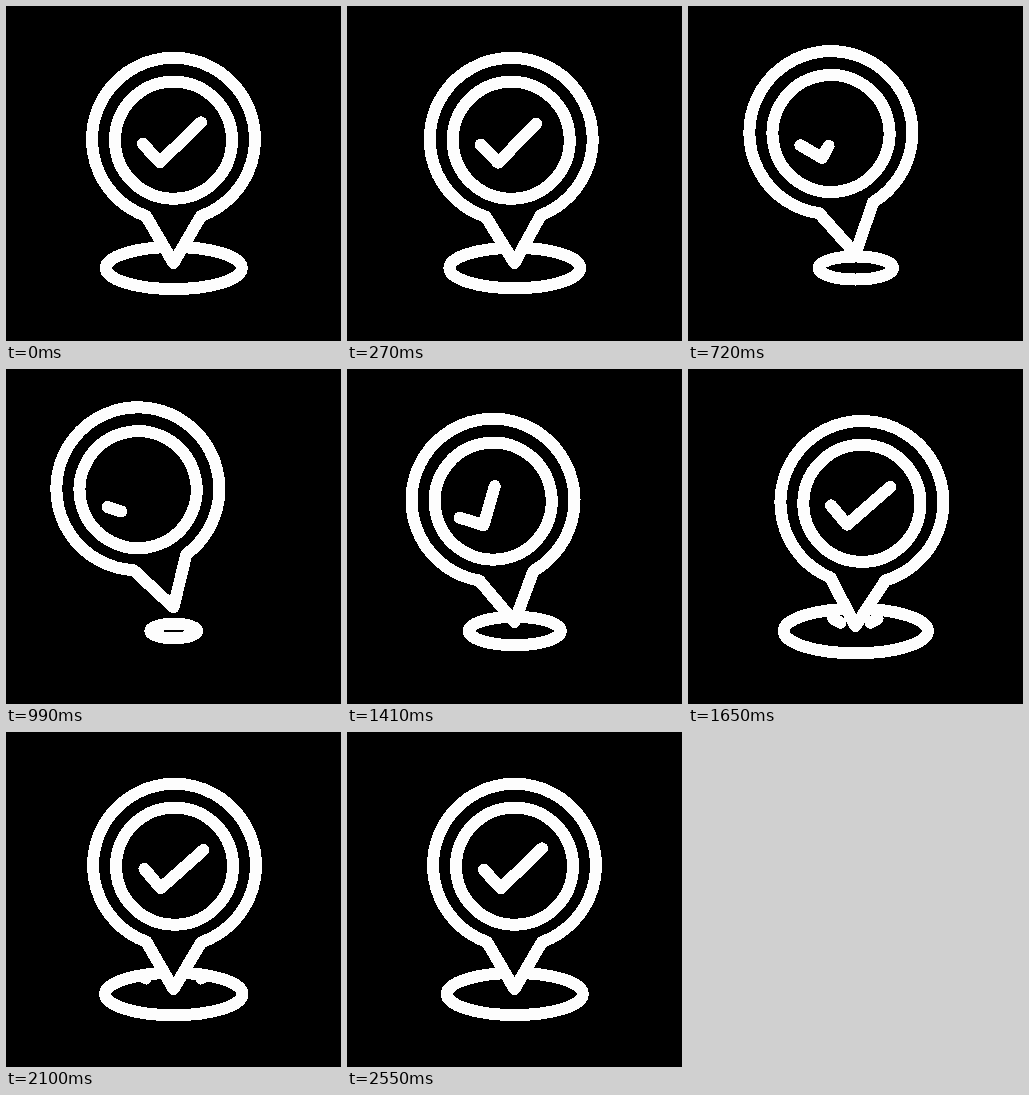
Animation of 335 by 335 pixels, one loop 4500 ms. Source, as an HTML page:

```html
<!DOCTYPE html>
<html lang="en">
<head>
<meta charset="utf-8">
<title>Location pin</title>
<style>
  html, body { margin: 0; height: 100%; overflow: hidden; background: #000; }
  svg { display: block; width: 100%; height: 100%; }
  svg * { stroke-linecap: round; stroke-linejoin: round; shape-rendering: crispEdges; }
</style>
</head>
<body>
<svg viewBox="0 0 335 335" fill="none" stroke="#fdfdfd" stroke-width="12">
  <ellipse id="ground" cx="167.8" cy="262"/>
  <path id="dust"/>
  <g id="pin">
    <path d="M140 210A81.5 81.5 0 1 1 195 210L167.5 257Z" fill="#000"/>
    <circle cx="167.5" cy="134.2" r="58.5"/>
    <path id="tick" d="M136.8 137.8L153.8 156.3L195 116.3" pathLength="100"/>
  </g>
</svg>
<script>
const LOOP = 4500, STEP = 30, LAND = 1525, REST = 2550;
const el = id => document.getElementById(id);
const ground = el('ground'), dust = el('dust'), pin = el('pin'), tick = el('tick');

const part = (t, a, b) => Math.min(1, Math.max(0, (t - a) / (b - a)));

// Rises smoothly from 0 to 1, then drops back with growing speed
const hop = (t, from, peak, to) => t < peak
  ? (1 - Math.cos(Math.PI * part(t, from, peak))) / 2
  : 1 - part(t, peak, to) ** 2;

// Fading swing after the landing
const wobble = t => t < LAND ? 0
  : Math.sin(Math.PI * (t - LAND) / 198) * (1 - part(t, LAND, REST));

function draw(t) {
  const tilt = 3.7 * wobble(t) - 18 * hop(t, 60, 1180, LAND);
  const lift = -20 * hop(t, 370, 1110, 1445);
  pin.setAttribute('transform', `translate(0 ${lift}) rotate(${tilt} 167.5 257)`);

  const size = 1 - 0.68 * hop(t, 120, 1110, LAND) + 0.075 * wobble(t);
  ground.setAttribute('rx', 68 * size);
  ground.setAttribute('ry', 21 * size);

  const twist = 2 * hop(t, 1650, 2060, 2500) - 20 * hop(t, 300, 1500, 1650);
  const drawn = 100 - 90 * hop(t, 130, 1190, 1440);
  tick.setAttribute('transform', `rotate(${twist} 153.8 156.3)`);
  tick.setAttribute('stroke-dasharray', drawn < 100 ? `${drawn} 200` : 'none');

  // Two puffs slide outward from the tip and thin out
  const u = part(t, 1500, 2300), x = 31 - 23 * (1 - u) ** 3, y = 261 - x / 2;
  const puff = k => `M${167.5 + k * (x - 3.5)} ${y + 2}L${167.5 + k * (x + 3.5)} ${y - 2}`;
  dust.setAttribute('d', u > 0 && u < 1 ? puff(-1) + puff(1) : '');
  dust.setAttribute('stroke-width', 12 * (1 - u ** 6));
}

const start = performance.now();
function frame() {
  const t = (performance.now() - start) % LOOP;
  draw(Math.floor(t / STEP) * STEP);
  requestAnimationFrame(frame);
}
frame();
</script>
</body>
</html>
```
